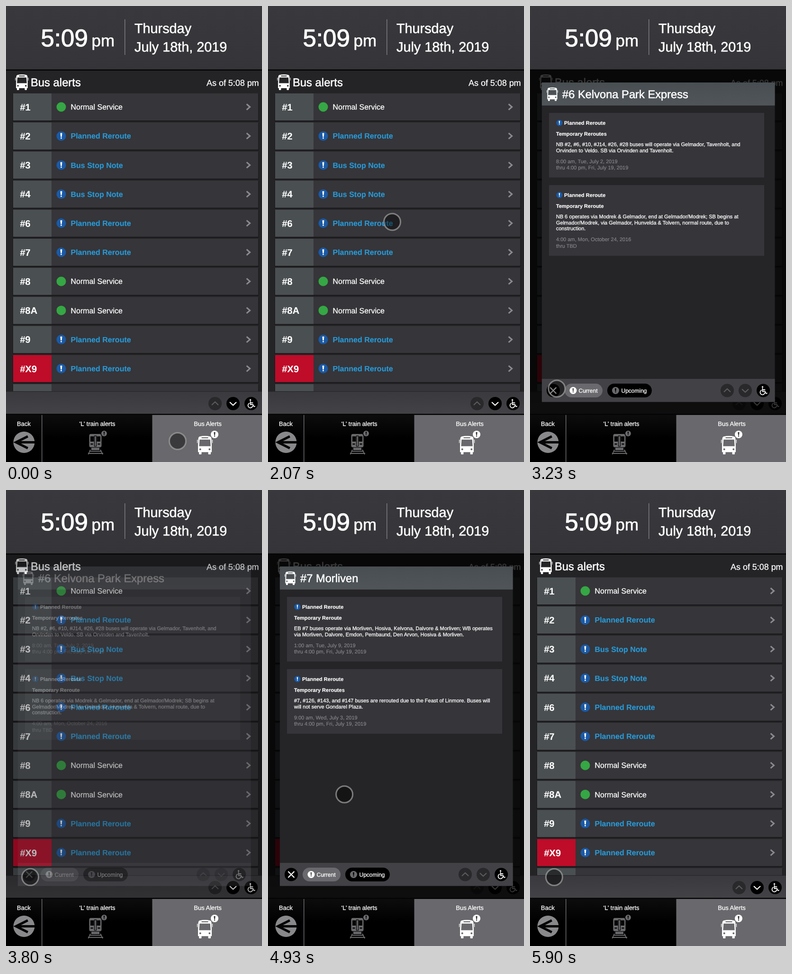
An HTML page for the animation above (5.93 s loop, 540 by 960 pixels).

```html
<!DOCTYPE html>
<html lang="en">
<head>
<meta charset="utf-8">
<title>Bus alerts</title>
<style>
  html, body { margin: 0; width: 100%; height: 100%; overflow: hidden; background: #000; }
  svg { display: block; width: 100vw; height: 100vh; }
  text {
    font-family: "Liberation Sans", Arial, Helvetica, sans-serif; white-space: pre;
    color: #fff; fill: currentColor; stroke: currentColor; stroke-width: .3px;
    text-rendering: geometricPrecision;
  }
  .bold { font-weight: 700; stroke-width: .15px; }
  .large { stroke-width: .55px; }
  .clock { stroke-width: 1.1px; }
  .link { color: #2899d6; }
  .date { color: #8d8c90; stroke-width: .1px; }
</style>
</head>
<body>
<svg id="stage" viewBox="0 0 540 960" xmlns="http://www.w3.org/2000/svg">
  <defs>
    <linearGradient id="headerFill" x2="0" y2="1">
      <stop offset="0" stop-color="#39383c"/><stop offset="1" stop-color="#353438"/>
    </linearGradient>
    <linearGradient id="footerFill" x2="0" y2="1">
      <stop offset="0" stop-color="#3a393d"/><stop offset="1" stop-color="#434246"/>
    </linearGradient>
    <linearGradient id="titleFill" x2="0" y2="1">
      <stop offset="0" stop-color="#484e51"/><stop offset="1" stop-color="#4f5558"/>
    </linearGradient>
    <linearGradient id="tabFill" x2="0" y2="1">
      <stop offset="0" stop-color="#0d0d0e"/><stop offset=".5" stop-color="#000"/>
    </linearGradient>
    <clipPath id="listClip"><rect y="136" width="540" height="675"/></clipPath>
    <path id="bus" fill-rule="evenodd" d="M5 1Q14-1 23 1Q25.500 1.500 25.800 5L26.300 17V29H24.500V32Q24.500 33 23.500 33H21Q20 33 20 32V29H8V32Q8 33 7 33H4.500Q3.500 33 3.500 32V29H1.700V17L2.200 5Q2.500 1.500 5 1Z
      M8 2.500H20V4.300H8Z M4.500 6.500H23.500L24.300 18.500H3.700Z
      M4 24a1.700 1.700 0 1 0 3.400 0a1.700 1.700 0 1 0-3.400 0Z M20.600 24a1.700 1.700 0 1 0 3.400 0a1.700 1.700 0 1 0-3.400 0Z
      M0 7H1.200L.8 13H0Z M26.800 7H28V13H27.200Z"/>
    <path id="mark" d="M-.2-.6Q0-.68 .2-.6L.12.2H-.12ZM-.15.43a.15.15 0 1 0 .3 0a.15.15 0 1 0-.3 0Z"/>
    <g id="wheelchair" fill="none" stroke="#fff" stroke-width="1.800" stroke-linecap="round" stroke-linejoin="round">
      <circle cx="-1.500" cy="-7.500" r="1.700" fill="#fff" stroke="none"/>
      <path d="M-1.500-4.500V2H4L6 6.500L8 5.700M-1.500-1.500H3.500M-4-.5A5 5 0 1 0 3.300 5"/>
    </g>
  </defs>
</svg>
<script>
const LOOP = 5930;
const stage = document.getElementById('stage');

const rect = (x, y, w, h, fill, extra = '') =>
  `<rect x="${x}" y="${y}" width="${w}" height="${h}" fill="${fill}" ${extra}/>`;
const label = (x, y, size, str, cls = '', anchor = 'start') =>
  `<text x="${x}" y="${y}" font-size="${size}" class="${cls}" text-anchor="${anchor}">${str.replace(/&/g, '&amp;')}</text>`;
const disc = (x, y, r, fill) => `<circle cx="${x}" cy="${y}" r="${r}" fill="${fill}"/>`;
const line = (d, stroke, width) =>
  `<path d="${d}" fill="none" stroke="${stroke}" stroke-width="${width}"/>`;
const use = (id, x, y, scale, fill) =>
  `<use href="#${id}" transform="translate(${x} ${y}) scale(${scale})" fill="${fill}"/>`;
const badge = (x, y, r, back, front) => disc(x, y, r, back) + use('mark', x, y, r, front);

function arrowButton(x, y, dir, active) {
  return disc(x, y, 14, active ? '#000' : '#29282b') +
    line(`M${x - 7} ${y - 3 * dir}L${x} ${y + 3.5 * dir}L${x + 7} ${y - 3 * dir}`, active ? '#fff' : '#5c5b5f', 2.2);
}
const accessButton = (x, y) => disc(x, y, 14, '#000') + use('wheelchair', x, y, 1, 'none');

function header() {
  return rect(0, 0, 540, 134, 'url(#headerFill)') + rect(0, 133.5, 540, 2.5, '#050505') +
    label(73.5, 85, 51, '5:09', 'clock') + label(180.5, 85, 35, 'pm', 'large') +
    rect(250, 28, 1.5, 75, '#7c7b7f') +
    label(271, 57, 28.8, 'Thursday', 'large') + label(271, 96, 28.8, 'July 18th, 2019', 'large');
}

function row(name, status, i) {
  const y = 184 + i * 61.2, mid = y + 28.5;
  const normal = status === 'Normal Service';
  return rect(14, y + 1, 519, 58, '#19181a') + rect(15, y, 517, 57, '#363539') +
    rect(15, y, 81, 57, name === '#X9' ? '#be0c29' : '#4a4f51') +
    label(29.5, mid + 7.2, 20, name, 'bold') +
    (normal ? disc(116.5, mid, 10, '#35a744') : badge(116.5, mid, 10, '#1a5aa7', '#fff')) +
    label(136.5, mid + 5.7, 16, status, normal ? '' : 'bold link') +
    line(`M507.500 ${mid - 6}L514.500 ${mid}L507.500 ${mid + 6}`, '#8b8a8e', 3);
}

function busList() {
  const reroute = 'Planned Reroute', note = 'Bus Stop Note', normal = 'Normal Service';
  const rows = [['#1', normal], ['#2', reroute], ['#3', note], ['#4', note], ['#6', reroute], ['#7', reroute],
    ['#8', normal], ['#8A', normal], ['#9', reroute], ['#X9', reroute], ['', normal]];
  return rect(0, 136, 540, 676, '#242326') + use('bus', 19.5, 144, 1, '#fff') +
    label(52, 169, 23.8, 'Bus alerts', 'large') +
    label(533.5, 168, 17.9, 'As of 5:08 pm', '', 'end') +
    `<g clip-path="url(#listClip)">${rows.map(([n, s], i) => row(n, s, i)).join('')}</g>` +
    rect(0, 812, 540, 47, 'url(#footerFill)') +
    arrowButton(441, 837, -1, false) + arrowButton(479, 837, 1, true) + accessButton(517, 837);
}

function train() {
  const g = '#69686b', dark = '#050505';
  return rect(175.5, 901, 26, 28, g, 'rx="3.500"') +
    rect(178, 906, 7.5, 11, dark) + rect(191.5, 906, 7.5, 11, dark) +
    rect(186.5, 905, 4, 22, 'none', `stroke="${dark}" stroke-width="1.200"`) +
    rect(178.5, 921, 5, 2.5, dark) + rect(193.5, 921, 5, 2.5, dark) +
    rect(180, 930, 17, 5, g) +
    line('M178 934L173.500 944M199 934L204 944M176 937.500H202M173 942H205', g, 1.8);
}

function tabs() {
  return rect(0, 859, 540, 101, 'url(#tabFill)') + rect(0, 858.5, 540, 2.5, '#050505') +
    rect(75, 861, 1.5, 99, '#69686c') + rect(308.5, 861, 231.5, 99, '#69686c') +
    label(37.5, 884, 13, 'Back', '', 'middle') + label(192.5, 884, 13, '‘L’ train alerts', '', 'middle') +
    label(425.5, 884, 13, 'Bus Alerts', '', 'middle') +
    disc(38, 918.5, 22.5, '#89888a') +
    line('M46 906L21 918.500L46 931M23 918.500H61', '#050505', 5) +
    train() + disc(207, 900, 7.5, '#000') + badge(207, 900, 6, '#69686b', '#000') +
    use('bus', 403, 905, 1.18, '#fff') + badge(440, 902, 8, '#fff', '#333');
}

function card(y, title, lines, dates) {
  const n = lines.length;
  return rect(40, y, 454, 110.5 + 12.8 * n, '#363539') +
    badge(62, y + 21, 6.5, '#1a5aa7', '#fff') + label(72, y + 25, 11, 'Planned Reroute', 'bold') +
    label(55, y + 48, 11, title, 'bold') +
    lines.map((s, i) => label(55, y + 70 + 12.7 * i, 11, s)).join('') +
    dates.map((s, i) => label(55, y + 80.2 + 12.7 * n + 13.3 * i, 11, s, 'date')).join('');
}

function modal(id, title, cards) {
  return `<g id="${id}">` + rect(0, 136, 540, 723, '#000', 'opacity=".78"') +
    rect(25, 161, 491.5, 672.5, '#252427') + rect(25, 161, 491.5, 48.5, 'url(#titleFill)') +
    use('bus', 35, 171.5, 0.86, '#fff') + label(68, 194, 23.7, title, 'large') + cards.join('') +
    rect(25, 785, 491.5, 48.5, '#424145') +
    disc(49, 809.5, 14, '#000') + line('M42.500 803L55.500 816M55.500 803L42.500 816', '#fff', 2.2) +
    rect(73, 795, 80, 29, '#6a696d', 'rx="14.500"') + badge(91, 809.5, 7.5, '#fff', '#555') +
    label(102.5, 813.5, 12, 'Current') +
    rect(163, 795, 94, 29, '#000', 'rx="14.500"') + badge(180.5, 809.5, 7.5, '#6a696d', '#000') +
    label(192.5, 813.5, 12, 'Upcoming') +
    arrowButton(416, 809.5, -1, false) + arrowButton(454, 809.5, 1, false) + accessButton(492, 809.5) + '</g>';
}

const route6 = modal('route6', '#6 Kelvona Park Express', [
  card(225, 'Temporary Reroutes', [
    'NB #2, #6, #10, #J14, #26, #28 buses will operate via Gelmador, Tavenholt, and',
    'Orvinden to Veldo. SB via Orvinden and Tavenholt.'],
    ['8:00 am, Tue, July 2, 2019', 'thru 4:00 pm, Fri, July 19, 2019']),
  card(377, 'Temporary Reroute', [
    'NB 6 operates via Modrek & Gelmador, end at Gelmador/Modrek; SB begins at',
    'Gelmador/Modrek, via Gelmador, Hunvelda & Tolvern, normal route, due to',
    'construction.'],
    ['4:00 am, Mon, October 24, 2016', 'thru TBD'])]);

const route7 = modal('route7', '#7 Morliven', [
  card(225, 'Temporary Reroute', [
    'EB #7 buses operate via Morliven, Hosiva, Kelvona, Dalvore & Morliven; WB operates',
    'via Morliven, Dalvore, Emdon, Pembaund, Den Arvon, Hosiva & Morliven.'],
    ['1:00 am, Tue, July 9, 2019', 'thru 4:00 pm, Fri, July 19, 2019']),
  card(377, 'Temporary Reroutes', [
    '#7, #126, #143, and #147 buses are rerouted due to the Feast of Linmore. Buses will',
    'will not serve Gondarel Plaza.'],
    ['9:00 am, Wed, July 3, 2019', 'thru 4:00 pm, Fri, July 19, 2019'])]);

stage.insertAdjacentHTML('beforeend', busList() + route6 + route7 + header() + tabs() +
  '<circle id="pointer" r="17.500" fill="#000" fill-opacity=".45" stroke="#a0a0a0" stroke-opacity=".72" stroke-width="3"/>');

const pointer = document.getElementById('pointer');
const popups = [
  { node: document.getElementById('route6'), open: 2080, close: 3700 },
  { node: document.getElementById('route7'), open: 4580, close: 5690 }
];
const FADE = 150;

// Pointer legs: start time, duration, from, to, sideways bow.
const listRow6 = [262, 454.5], listRow7 = [233, 508], closeSpot = [51, 815];
const legs = [
  { at: 620, span: 630, from: [362, 916], to: listRow6, bow: 0 },
  { at: 2470, span: 960, from: listRow6, to: closeSpot, bow: 0 },
  { at: 3800, span: 700, from: closeSpot, to: listRow7, bow: 0 },
  { at: 4690, span: 940, from: listRow7, to: closeSpot, bow: 6 }
];

const clamp = v => Math.min(1, Math.max(0, v));

// cubic-bezier(.25, .1, .25, 1), solved by bisection.
function ease(p) {
  if (p <= 0 || p >= 1) return clamp(p);
  const bezier = (s, a, b) => 3 * a * s * (1 - s) ** 2 + 3 * b * s * s * (1 - s) + s ** 3;
  let lo = 0, hi = 1;
  for (let i = 0; i < 24; i++) {
    const mid = (lo + hi) / 2;
    if (bezier(mid, 0.25, 0.25) < p) lo = mid; else hi = mid;
  }
  return bezier(lo, 0.1, 1);
}

function pointerAt(t) {
  const leg = legs.filter(l => t >= l.at).pop() || legs[0];
  const e = ease(clamp((t - leg.at) / leg.span));
  const dx = leg.to[0] - leg.from[0], dy = leg.to[1] - leg.from[1];
  const side = leg.bow * 4 * e * (1 - e) / Math.hypot(dx, dy);
  return [leg.from[0] + dx * e + dy * side, leg.from[1] + dy * e - dx * side];
}

function render(t) {
  for (const { node, open, close } of popups) {
    const shown = clamp((t - open) / FADE) * (1 - clamp((t - close) / FADE));
    node.setAttribute('opacity', shown);
    node.setAttribute('display', shown ? 'inline' : 'none');
  }
  const [x, y] = pointerAt(t);
  pointer.setAttribute('cx', x);
  pointer.setAttribute('cy', y);
}

const began = performance.now();
function tick() {
  render((performance.now() - began) % LOOP);
  requestAnimationFrame(tick);
}
tick();
</script>
</body>
</html>
```
